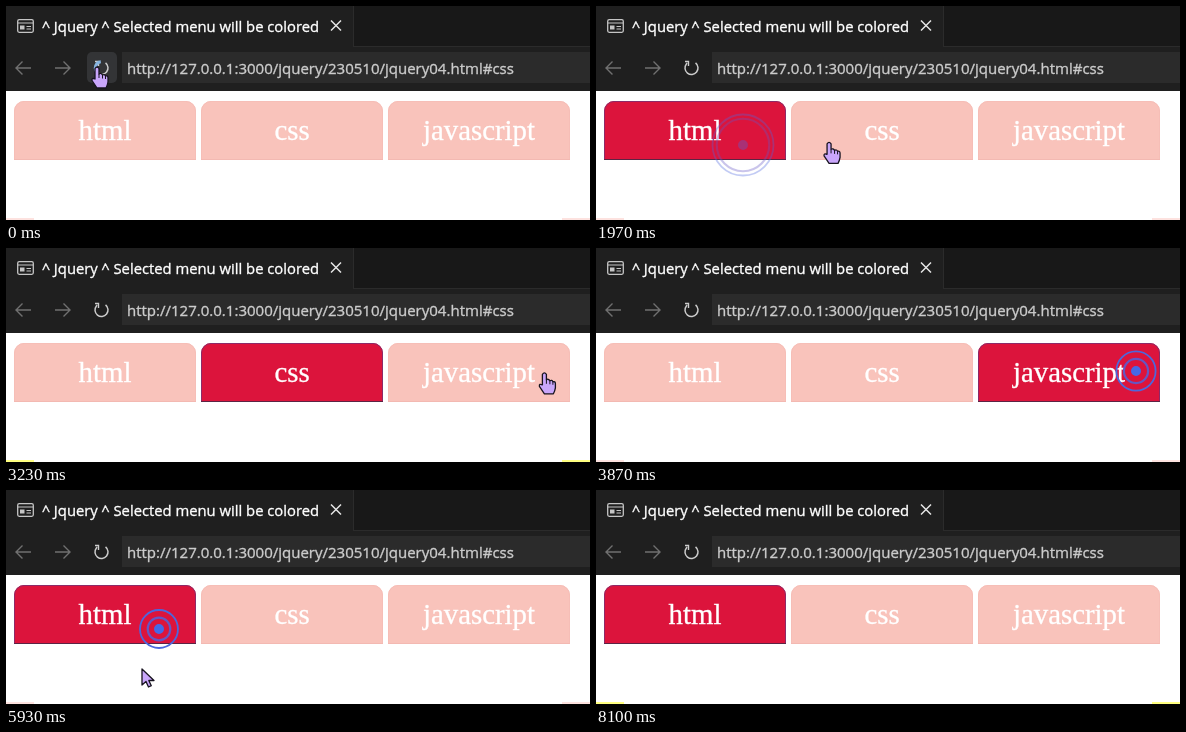
Animation of 584 by 214 pixels, one loop 8370 ms. Source, as an HTML page with a canvas:

```html
<!DOCTYPE html>
<html lang="en">
<head>
<meta charset="utf-8">
<title>Selected menu</title>
<style>
  html, body { margin: 0; width: 100%; height: 100%; overflow: hidden; background: #fff; }
  canvas { display: block; }
</style>
</head>
<body>
<canvas id="stage" width="584" height="214"></canvas>
<script>
const LOOP = 8370, RING_MS = 420, FLICK_MS = 30, BLINK_MS = 500;
const ctx = document.getElementById('stage').getContext('2d');

const labels = ['html', 'css', 'javascript'];
const TAB_W = 182, TAB_H = 59, TAB_TOP = 95;
const tabX = i => 8 + i * 187;

// The pointer rests at each stop, then leaves with a flick to "exit" if there is one.
// "pick" is when the tab lights up; the click rings start on leaving.
const stops = [
  { x: 91, y: 61, arrive: 0, leave: 570 },
  { tab: 0, x: 147, y: 139, arrive: 1040, pick: 1600, leave: 1630 },
  { tab: 1, x: 342, y: 133, arrive: 2370, pick: 2370, leave: 2600, exit: [486, 183] },
  { tab: 2, x: 540, y: 123, arrive: 3300, pick: 3650, leave: 3830, exit: [600, 190] },
  { tab: 1, x: 358, y: 146, arrive: 4720, pick: 4740, leave: 4900 },
  { tab: 0, x: 153, y: 139, arrive: 5600, pick: 5640, leave: 5900, exit: [136, 179] },
  { x: 110, y: 225, arrive: 6070, leave: LOOP }
];

const mix = (a, b, u) => a.map((v, i) => v + (b[i] - v) * u);
const smooth = u => u * u * (3 - 2 * u);

function pointerAt(t) {
  const i = stops.findLastIndex(s => s.arrive <= t);
  const { x, y, leave, exit } = stops[i], home = [x, y];
  if (t <= leave) return home;
  if (exit && t < leave + FLICK_MS) return mix(home, exit, (t - leave) / FLICK_MS);
  const from = exit ? leave + FLICK_MS : leave;
  const next = stops[i + 1];
  return mix(exit || home, [next.x, next.y], smooth((t - from) / (next.arrive - from)));
}

function rect(x, y, w, h, color) {
  ctx.fillStyle = color;
  ctx.fillRect(x, y, w, h);
}

function strokeWith(color, width) {
  ctx.strokeStyle = color;
  ctx.lineWidth = width;
  ctx.stroke();
}

function round(x, y, w, h, r, fill, line, width = 1) {
  ctx.beginPath();
  ctx.roundRect(x, y, w, h, r);
  if (fill) {
    ctx.fillStyle = fill;
    ctx.fill();
  }
  if (line) strokeWith(line, width);
}

function lines(color, width, ...runs) {
  ctx.beginPath();
  for (const [x, y, ...rest] of runs) {
    ctx.moveTo(x, y);
    for (let i = 0; i < rest.length; i += 2) ctx.lineTo(rest[i], rest[i + 1]);
  }
  strokeWith(color, width);
}

function arc(x, y, r, color, width, from = 0, to = Math.PI * 2) {
  ctx.beginPath();
  ctx.arc(x, y, r, from, to);
  strokeWith(color, width);
}

// A hairline stroke gives the text its slightly heavy screen weight.
function text(str, x, y, font, color, align = 'left') {
  ctx.font = font;
  ctx.textAlign = align;
  ctx.fillStyle = ctx.strokeStyle = color;
  ctx.lineWidth = 0.35;
  ctx.fillText(str, x, y);
  ctx.strokeText(str, x, y);
}

// Arrow pointing left for dir -1, right for dir 1.
function navArrow(x, dir) {
  const tip = x + dir * 7.5, wing = x + dir;
  lines('#707070', 1.4, [x - dir * 7.5, 62, tip, 62], [wing, 55.5, tip, 62, wing, 68.5]);
}

function reloadIcon(hover) {
  if (hover) round(81, 46, 30, 31, 5, '#333436');
  arc(95.5, 62, 6.5, '#cccccc', 1.5, -0.9, Math.PI * 1.27);
  lines('#cccccc', 1.4, [89, 55.5, 92.5, 55.5, 92.5, 60]);
  if (hover) arc(95.5, 62, 6.2, '#86b4df', 3, 2, 4.6);
}

function pageIcon() {
  const gray = '#c5c5c5';
  round(11.7, 13.7, 15.6, 12.6, 1.5, null, gray, 1.3);
  lines(gray, 1.2, [12, 17, 27, 17], [20.5, 20.5, 25, 20.5], [20.5, 23, 25, 23]);
  rect(14, 19.5, 4.5, 4, gray);
}

function browser(hover) {
  rect(0, 0, 584, 85, '#1f1f1f');
  rect(348, 0, 236, 41, '#181818');
  rect(347, 0, 1, 41, '#2b2b2b');
  rect(347, 40, 237, 1, '#2b2b2b');

  pageIcon();
  text('^ Jquery ^ Selected menu will be colored', 36, 25.5, '14.8px "Open Sans", sans-serif', '#ffffff');
  lines('#e6e6e6', 1.5, [325, 14.5, 335, 24.5], [335, 14.5, 325, 24.5]);

  navArrow(17.5, -1);
  navArrow(56.5, 1);
  reloadIcon(hover);
  rect(116, 46, 468, 31, '#2b2b2b');
  text('http://127.0.0.1:3000/jquery/230510/jquery04.html#css', 121, 68, '15px "Open Sans", sans-serif', '#cccccc');
}

function menu(selected) {
  labels.forEach((label, i) => {
    const x = tabX(i), on = i === selected;
    round(x, TAB_TOP, TAB_W, TAB_H, [10, 10, 0, 0], on ? '#dc143c' : '#f9c3bb');
    round(x + 0.5, TAB_TOP + 0.5, TAB_W - 1, TAB_H - 1, [9.5, 9.5, 0, 0], null, on ? '#8c2a68' : '#f6beb7');
    rect(x, TAB_TOP + TAB_H - 1, TAB_W, 1, on ? '#5c2444' : '#f3b9b2');
    text(label, x + TAB_W / 2, 134, '28.8px "Liberation Serif", serif', '#ffffff', 'center');
  });
}

// Corners of a blinking box at the lower edge of the page.
function blinkBox(t) {
  const yellow = Math.floor((t - 70) / BLINK_MS) % 2 === 0;
  for (const x of [0, 556]) rect(x, 212, 28, 2, yellow ? '#ffff80' : '#fde2df');
}

function rings(t) {
  for (const { tab, x, y, leave } of stops) {
    const p = (t - leave) / RING_MS;
    if (tab === undefined || p < 0 || p >= 1) continue;
    const r = 17 + 14 * (1 - (1 - p) ** 2);
    ctx.globalAlpha = 1 - p * p;
    arc(x, y, r, '#4c68de', 1.8);
    arc(x, y, 1.3 * r - 13.4, '#6557c4', 2.2);
    arc(x, y, 2.5, '#456ae8', 5);
    ctx.globalAlpha = 1;
  }
}

const arrow = new Path2D('M0 0V16L4 12.5L6.5 18L9.3 16.7L6.8 11.5H12Z');
const hand = new Path2D(
  'M-2 1.5Q0 -1.5 2 1.5V7Q4 5.5 5.5 8Q7.5 6.8 8.5 9Q11 8.2 11 11V15' +
  'Q10.5 18 9 21H0L-5 13.5Q-5.5 10.5 -2 12Z'
);

function pointer(x, y, isHand) {
  const shape = isHand ? hand : arrow, ink = '#17131f';
  ctx.save();
  ctx.translate(x, y);
  ctx.fillStyle = '#c9a6fb';
  ctx.fill(shape);
  ctx.strokeStyle = ink;
  ctx.lineWidth = 1.3;
  ctx.lineJoin = 'round';
  ctx.stroke(shape);
  if (isHand) lines(ink, 1, [2, 7, 2, 11], [5.5, 8, 5.5, 11.5], [8.5, 9, 8.5, 12]);
  ctx.restore();
}

const inside = (px, py, x, y, w, h) => px >= x && px <= x + w && py >= y && py <= y + h;

function draw(t) {
  const [x, y] = pointerAt(t);
  const onReload = inside(x, y, 81, 46, 30, 31);
  const onTab = labels.some((_, i) => inside(x, y, tabX(i), TAB_TOP, TAB_W, TAB_H));
  const picked = stops.findLast(s => s.pick <= t);

  rect(0, 0, 584, 214, '#ffffff');
  browser(onReload);
  menu(picked ? picked.tab : -1);
  blinkBox(t);
  rings(t);
  pointer(x, y, onReload || onTab);
}

const start = performance.now();
function tick() {
  draw((performance.now() - start) % LOOP);
  requestAnimationFrame(tick);
}
tick();
</script>
</body>
</html>
```
